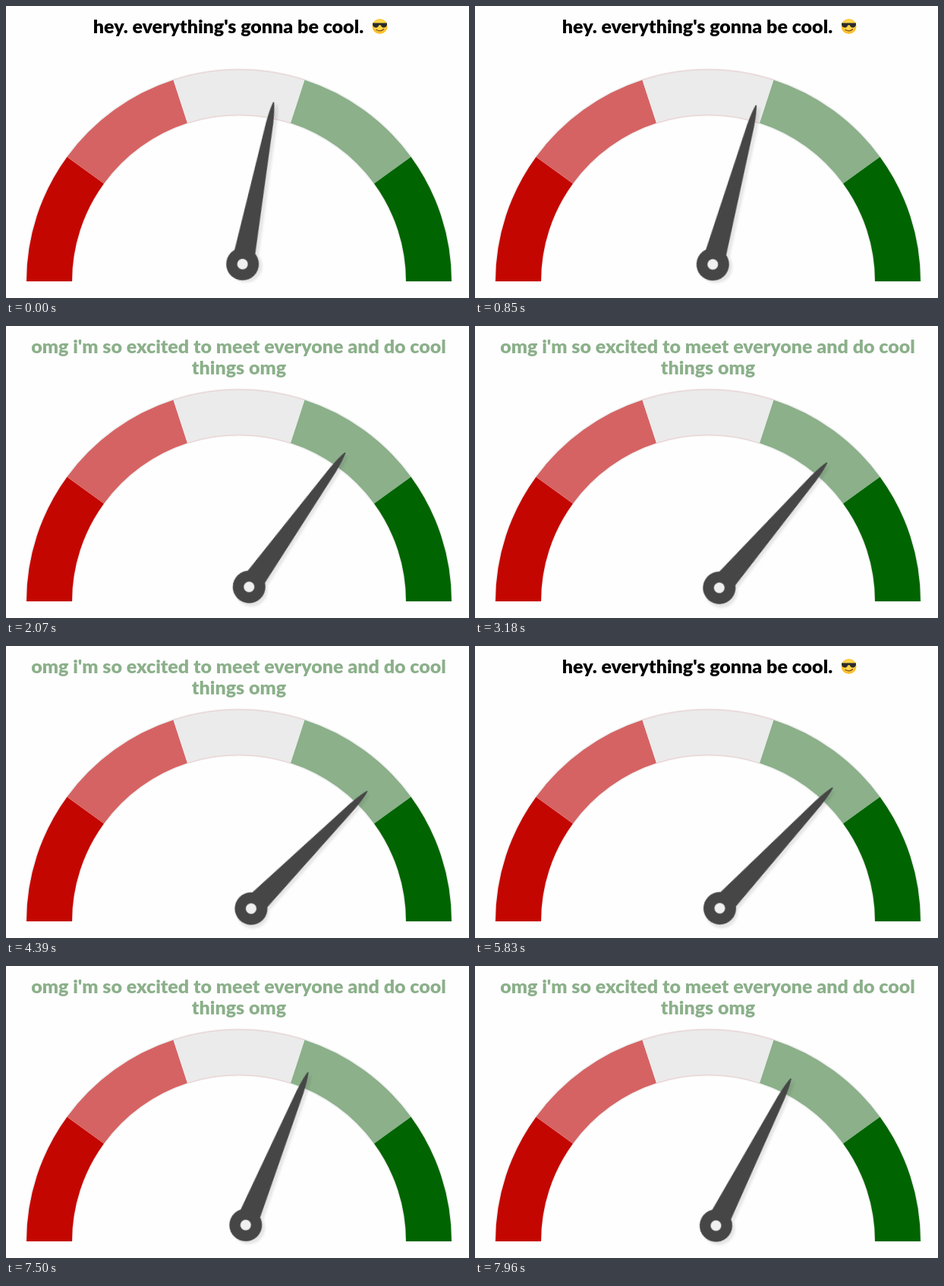
These frames come from a looping animation (610 px wide and 386 px high, 8000 ms). An HTML page:

```html
<!DOCTYPE html>
<html lang="en">
<head>
<meta charset="utf-8">
<title>Mood gauge</title>
<style>
  html, body { margin: 0; width: 100%; height: 100%; overflow: hidden; background: #fefefe; }
  svg { display: block; width: 610px; height: 386px; }
  text { font: 900 25px Lato, "Open Sans", sans-serif; text-anchor: middle; }
  #calm { fill: #000; }
  #excited { fill: #8bb08a; }
  #needle { transform-origin: 0 0; }
  #shadow { filter: blur(1.5px); opacity: .13; }
</style>
</head>
<body>
<svg viewBox="0 0 610 386">
  <g id="calm">
    <text x="293" y="36">hey. everything's gonna be cool.</text>
    <g transform="translate(492.5 27)">
      <circle r="10" fill="#fbc02d"/>
      <circle r="8" cy="-1" fill="#ffd54a"/>
      <path d="M-9.5-4.5H9.5V-2.5C9 2.5 2.5 3 1.2-1.8H-1.2C-2.5 3-9 2.5-9.5-2.5Z" fill="#2b2b2b"/>
      <path d="M-4.5 4.5Q1 7.5 5 3.8" fill="none" stroke="#7a4310" stroke-width="1.4" stroke-linecap="round"/>
    </g>
  </g>
  <g id="excited">
    <text x="306.5" y="36">omg i'm so excited to meet everyone and do cool</text>
    <text x="307" y="64">things omg</text>
  </g>
  <g id="gauge" transform="translate(307 364)"></g>
  <g transform="translate(307.5 362.8)">
    <g id="needle">
      <g id="shadow" transform="translate(5 2)"><use href="#pointer"/></g>
      <g id="pointer" fill="#464646">
        <path d="M-14-36L-4.8-212Q-3.2-231-.8-239.5Q0-241 .8-239.5Q3.2-231 4.8-212L14-36Z"/>
        <circle cy="-22" r="21.5"/>
      </g>
      <circle cy="-22" r="7" fill="#f0f0f0"/>
    </g>
  </g>
</svg>
<script>
  const LOOP = 8000, SWING = 800, OUTER = 280, INNER = 220;
  const byId = id => document.getElementById(id);

  const point = (radius, deg) => {
    const a = deg * Math.PI / 180;
    return `${-radius * Math.cos(a)} ${-radius * Math.sin(a)}`;
  };
  const arc = (radius, from, to) =>
    `${point(radius, from)}A${radius} ${radius} 0 0 ${to > from ? 1 : 0} ${point(radius, to)}`;

  function addPath(d, style) {
    const path = document.createElementNS('http://www.w3.org/2000/svg', 'path');
    path.setAttribute('d', d);
    Object.assign(path.style, { fill: 'none', ...style });
    byId('gauge').append(path);
  }

  for (const radius of [OUTER, INNER])
    addPath(`M${arc(radius, 0, 180)}`, { stroke: '#f0f0f0', strokeWidth: 3 });
  ['#c40600', '#d66363', '#ebebeb', '#8bb08a', '#006400'].forEach((fill, i) => {
    const from = i * 36, to = from + 36;
    addPath(`M${arc(OUTER, from, to)}L${arc(INNER, to, from)}Z`, { fill });
  });
  for (const radius of [OUTER, INNER])
    addPath(`M${arc(radius, 72, 108)}`, { stroke: '#e9b9b9', strokeWidth: .6 });

  // Each swing: start time in ms, angle to reach in degrees.
  const swings = [[45, 15.2], [1495, 36.6], [2945, 44.6], [4385, 43.1], [5825, 16.2], [7265, 26.95]];
  const timing = { duration: LOOP, iterations: Infinity };

  let angle = 10.84;
  const pose = (time, easing = 'linear') =>
    ({ offset: time / LOOP, transform: `rotate(${angle}deg)`, easing });
  const poses = [pose(0)];
  for (const [start, next] of swings) {
    poses.push(pose(start, 'ease'));
    angle = next;
    poses.push(pose(Math.min(start + SWING, LOOP)));
  }
  // The loop cuts the last swing short just before it settles.
  poses[poses.length - 1].offset = 1;

  const captions = [[0, 1], [1500, 0], [5830, 1], [7270, 0], [LOOP, 0]];
  const blink = flip => captions.map(([time, calm]) =>
    ({ offset: time / LOOP, opacity: flip ? 1 - calm : calm, easing: 'step-end' }));

  const animations = [
    byId('needle').animate(poses, timing),
    byId('calm').animate(blink(false), timing),
    byId('excited').animate(blink(true), timing)
  ];
  const begin = document.timeline.currentTime ?? 0;
  for (const animation of animations) animation.startTime = begin;
</script>
</body>
</html>
```
